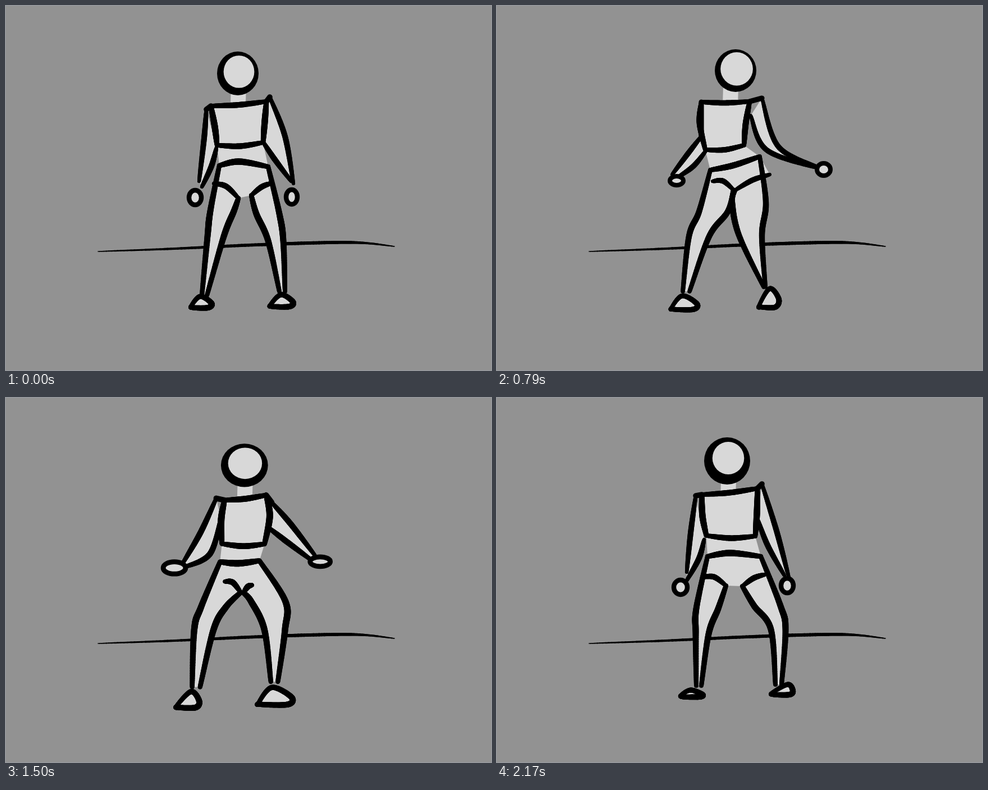
Animation, 864 px wide and 648 px high, one loop 2.33 s. Source, as an HTML page with a canvas:

```html
<!DOCTYPE html>
<html lang="en">
<head>
<meta charset="utf-8">
<title>Sketched dancer</title>
<style>
html, body { margin: 0; width: 100%; height: 100%; overflow: hidden; background: #929292; }
canvas { display: block; }
</style>
</head>
<body>
<canvas id="stage" width="864" height="648"></canvas>
<script>
const LOOP = 2330, STEPS = 24, LIGHT = '#d8d8d8';
const ctx = document.getElementById('stage').getContext('2d');

// head: centre, radii, face centre, face scale    arms: outer and inner point per joint
// torso: left side, then right side               legs: outer x, inner x, y per joint
// hands: centre, radii                            feet: left, right, top, bottom, apex x
const stand = {
  pen: [10.5],
  head: [413, 120, 37, 39, 415, 117, .74],
  torso: [365, 178, 372, 215, 376, 248, 464, 170, 461, 205, 458, 243],
  waist: [380, 284, 415, 277, 467, 286],
  hips: [370, 316, 414, 342, 437, 337, 474, 315],
  armL: [357, 184, 375, 252, 353, 235, 366, 285, 344, 312, 349, 322],
  armR: [470, 162, 458, 242, 497, 232, 478, 272, 512, 316, 508, 312],
  handL: [337, 341, 11, 13],
  handR: [509, 340, 10, 13],
  legL: [364, 406, 365, 359, 388, 410, 349, 358, 515],
  legR: [487, 446, 370, 494, 467, 418, 497, 487, 508],
  footL: [330, 366, 517, 537, 346],
  footR: [471, 511, 514, 535, 490]
};
const pocket = {
  pen: [8],
  head: [404, 122, 33, 33, 405, 121, .82],
  torso: [370, 168, 366, 200, 375, 246, 462, 184, 449, 220, 433, 248],
  waist: [358, 301, 375, 285, 438, 268],
  hips: [400, 335, 418, 334, 420, 333, 436, 320],
  armL: [352, 172, 362, 192, 320, 248, 341, 254, 358, 300, 372, 292],
  armR: [470, 185, 452, 212, 477, 240, 455, 252, 487, 308, 482, 296],
  handL: [372, 312, 10, 13],
  handR: [481, 300, 4, 9],
  legL: [367, 411, 370, 372, 402, 420, 372, 377, 508],
  legR: [486, 439, 372, 482, 456, 425, 474, 466, 504],
  footL: [347, 376, 513, 539, 364],
  footR: [467, 502, 513, 537, 478]
};
const swing = {
  pen: [10],
  head: [425, 115, 37, 38, 427, 112, .78],
  torso: [364, 171, 361, 208, 371, 256, 450, 170, 443, 210, 440, 248],
  waist: [380, 292, 420, 284, 468, 268],
  hips: [384, 312, 421, 327, 424, 328, 486, 300],
  armL: [364, 232, 372, 258, 340, 263, 350, 285, 312, 300, 322, 305],
  armR: [472, 164, 452, 195, 501, 250, 480, 256, 572, 287, 572, 289],
  handL: [320, 311, 12, 8],
  handR: [582, 291, 12, 11],
  legL: [360, 411, 366, 342, 378, 410, 331, 343, 508],
  legR: [479, 419, 350, 472, 431, 408, 478, 475, 500],
  footL: [311, 356, 516, 540, 330],
  footR: [467, 502, 503, 536, 486]
};
const stride = {
  pen: [10.5],
  head: [432, 114, 41, 40, 434, 110, .74],
  torso: [388, 172, 373, 210, 382, 260, 468, 172, 468, 215, 466, 260],
  waist: [392, 299, 425, 293, 465, 278],
  hips: [426, 342, 433, 341, 437, 342, 440, 342],
  armL: [375, 166, 376, 222, 354, 212, 372, 255, 330, 290, 334, 288],
  armR: [466, 166, 472, 218, 512, 206, 512, 238, 572, 264, 575, 276],
  handL: [318, 297, 24, 9],
  handR: [584, 272, 18, 9],
  legL: [356, 398, 378, 334, 372, 410, 319, 334, 510],
  legR: [502, 441, 355, 484, 446, 415, 487, 470, 505],
  footL: [283, 330, 520, 550, 316],
  footR: [446, 498, 518, 545, 470]
};
const crouch = {
  pen: [11.5],
  head: [416, 127, 43, 37, 416, 124, .7],
  torso: [391, 194, 396, 225, 388, 259, 458, 174, 472, 205, 454, 260],
  waist: [368, 283, 400, 296, 435, 304],
  hips: [345, 308, 400, 352, 406, 352, 437, 322],
  armL: [374, 194, 391, 205, 338, 272, 352, 306, 296, 300, 296, 318],
  armR: [482, 210, 462, 246, 500, 245, 485, 277, 524, 300, 512, 308],
  handL: [278, 309, 15, 13],
  handR: [530, 315, 18, 8],
  legL: [337, 384, 365, 337, 367, 415, 347, 360, 520],
  legR: [493, 432, 372, 513, 478, 410, 481, 474, 505],
  footL: [330, 361, 526, 552, 346],
  footR: [455, 521, 512, 546, 478]
};
const settle = {
  pen: [11],
  head: [411, 118, 45, 37, 411, 116, .71],
  torso: [390, 162, 382, 210, 377, 250, 456, 176, 466, 212, 452, 252],
  waist: [374, 290, 410, 282, 460, 272],
  hips: [366, 338, 421, 335, 428, 332, 488, 328],
  armL: [364, 166, 388, 185, 322, 228, 352, 248, 290, 296, 302, 298],
  armR: [460, 232, 458, 270, 480, 268, 474, 296, 516, 305, 492, 313],
  handL: [271, 311, 17, 13],
  handR: [506, 317, 11, 13],
  legL: [362, 408, 385, 351, 391, 440, 337, 347, 520],
  legR: [493, 449, 365, 501, 473, 405, 497, 483, 492],
  footL: [316, 356, 532, 560, 336],
  footR: [476, 532, 496, 522, 494]
};
const rise = {
  pen: [10.5],
  head: [410, 112, 41, 42, 412, 107, .69],
  torso: [365, 172, 366, 210, 373, 245, 464, 161, 463, 205, 460, 246],
  waist: [375, 282, 415, 276, 470, 282],
  hips: [365, 319, 408, 334, 437, 335, 478, 314],
  armL: [354, 174, 369, 252, 345, 240, 360, 285, 338, 310, 338, 325],
  armR: [472, 153, 464, 215, 499, 240, 482, 262, 520, 320, 512, 316],
  handL: [327, 337, 12, 13],
  handR: [517, 334, 11, 13],
  legL: [355, 394, 375, 354, 377, 420, 355, 364, 512],
  legR: [505, 458, 370, 514, 488, 412, 507, 496, 510],
  footL: [328, 366, 520, 532, 345],
  footR: [490, 527, 510, 528, 518]
};

// Start time, pose, next pose, blend, upward stretch, left arm reach
const cels = [
  [0, stand], [80, stand, pocket, .15, 10], [210, stand, pocket, .5, 24], [290, stand, pocket, .85, 9],
  [420, pocket], [580, pocket, swing, .2], [670, pocket, swing, .6, 8],
  [790, swing], [880, swing, stride, .3, 18, .4], [960, swing, stride, .6, 30, 1.2],
  [1040, swing, stride, .85], [1130, swing, stride, .95],
  [1290, stride], [1380, stride, crouch, .15], [1460, stride, crouch, .45], [1580, stride, crouch, .85],
  [1670, crouch], [1750, crouch, settle, .35, 22], [1830, crouch, settle, .75, 30, .2],
  [1920, settle], [2080, settle, rise, .6],
  [2170, rise]
];

const blend = (a, b, mix) => Object.fromEntries(
  Object.keys(a).map(name => [name, a[name].map((v, i) => v + (b[name][i] - v) * mix)]));

const chunks = (list, size) =>
  Array.from({ length: list.length / size }, (_, i) => list.slice(i * size, i * size + size));

const between = ([x0, y0], [x1, y1], rise = 0) => [(x0 + x1) / 2, (y0 + y1) / 2 - rise];

// Catmull-Rom curve through the knots.
function curve(knots, closed = false) {
  const n = knots.length, spans = closed ? n : n - 1, points = [];
  const at = i => closed ? knots[(i + n) % n] : knots[Math.max(0, Math.min(n - 1, i))];
  for (let s = 0; s <= spans * STEPS; s++) {
    const i = Math.min(spans - 1, Math.floor(s / STEPS)), t = s / STEPS - i;
    points.push([0, 1].map(k => {
      const [a, b, c, d] = [at(i - 1)[k], at(i)[k], at(i + 1)[k], at(i + 2)[k]];
      return b + t / 2 * (c - a + t * (2 * a - 5 * b + 4 * c - d + t * (3 * (b - c) + d - a)));
    }));
  }
  return points;
}

function fill(points) {
  ctx.fillStyle = LIGHT;
  ctx.beginPath();
  points.forEach(([x, y]) => ctx.lineTo(x, y));
  ctx.fill();
}

// A line that swells in the middle and thins towards its ends.
function brush(points, width, thin = .75) {
  for (let i = 1; i < points.length; i++) {
    ctx.lineWidth = width * (thin + (1.08 - thin) * Math.sin(Math.PI * i / points.length));
    ctx.beginPath();
    ctx.moveTo(...points[i - 1]);
    ctx.lineTo(...points[i]);
    ctx.stroke();
  }
}

function disc(x, y, rx, ry, color) {
  ctx.fillStyle = color;
  ctx.beginPath();
  ctx.ellipse(x, y, rx, ry, 0, 0, 2 * Math.PI);
  ctx.fill();
}

function ring([x, y, rx, ry], width) {
  disc(x, y, rx, ry, LIGHT);
  ctx.lineWidth = width;
  ctx.stroke();
}

function drawHead([x, y, rx, ry, faceX, faceY, scale]) {
  disc(x, y, rx, ry, '#000');
  disc(faceX, faceY, rx * scale, ry * scale, LIGHT);
}

function footShape([left, right, top, bottom, apex]) {
  return curve([[left, bottom - 3], [apex, top], [right, (top + bottom) / 2 + 2],
    [right - 6, bottom], [left + 4, bottom]], true);
}

function drawFigure(p, lift, reach) {
  const [pen] = p.pen;
  const warp = ([x, y]) => [
    x < 350 && y < 400 ? x - (350 - x) * reach : x,
    y < 520 ? y - lift * (520 - y) / 440 : y
  ];
  const points = name => chunks(p[name], 2).map(warp);
  const round = ([x, y, ...rest]) => [...warp([x, y]), ...rest];

  const torso = points('torso'), waist = points('waist');
  const [hipL, crotchL, crotchR, hipR] = points('hips');
  const sideL = curve(torso.slice(0, 3)), sideR = curve(torso.slice(3));
  const [shoulderL, , chestL, shoulderR, , chestR] = torso;

  const arm = name => {
    const joints = points(name);
    return [0, 1].map(side => curve(joints.filter((_, i) => i % 2 === side)));
  };
  const leg = (name, ...starts) => {
    const rows = chunks(p[name], 3);
    return starts.map((start, side) => curve([start, ...rows.map(r => warp([r[side], r[2]]))]));
  };
  const arms = [arm('armL'), arm('armR')];
  const legs = [leg('legL', waist[0], crotchL), leg('legR', waist[2], crotchR)];
  const feet = [p.footL, p.footR].map(footShape);
  const belt = curve(waist);
  const thighs = [curve([hipL, between(hipL, crotchL, 8), crotchL]), curve([crotchR, between(crotchR, hipR, 4), hipR])];

  const head = round(p.head);
  head[5] += head[1] - p.head[1];
  const [neckX, neckY] = between([head[0], head[1]], between(shoulderL, shoulderR));
  fill([[neckX - 13, neckY], [neckX + 14, neckY], [neckX + 13, shoulderR[1] + 8], [neckX - 14, shoulderL[1] + 4]]);
  for (const [outer, inner] of [...arms, ...legs, [sideL, sideR]]) fill([...outer, ...[...inner].reverse()]);
  fill([chestL, chestR, waist[2], waist[0]]);
  fill([...belt, hipR, crotchR, crotchL, hipL]);
  feet.forEach(fill);

  for (const line of [...arms.flat(), ...thighs]) brush(line, pen * .88, .65);
  for (const line of [...legs.flat(), sideL, sideR, belt]) brush(line, pen);
  for (const line of feet) brush(line, pen * .9);
  brush(curve([chestL, between(chestL, chestR, -4), chestR]), pen * .9);
  brush([arms[0][0][0], shoulderL], pen * .85, 1);
  brush(curve([shoulderL, between(shoulderL, shoulderR, -2), shoulderR]), pen * .9);
  brush([shoulderR, arms[1][0][0]], pen * .85, 1);
  ring(round(p.handL), pen * .8);
  ring(round(p.handR), pen * .8);
  drawHead(head);
}

function drawCel([, from, to = from, mix = 0, lift = 0, reach = 0]) {
  ctx.fillStyle = '#929292';
  ctx.fillRect(0, 0, 864, 648);
  ctx.strokeStyle = '#000';
  ctx.lineCap = 'round';
  brush(curve([[164, 437], [300, 432], [450, 425], [580, 421], [640, 422], [692, 428]]), 5.5, .25);
  drawFigure(blend(from, to, mix), lift, reach);
}

const start = performance.now();
let shown;
function tick() {
  const time = (performance.now() - start) % LOOP;
  const cel = cels.findLast(([begin]) => begin <= time);
  if (cel !== shown) drawCel(shown = cel);
  requestAnimationFrame(tick);
}
tick();
</script>
</body>
</html>
```
